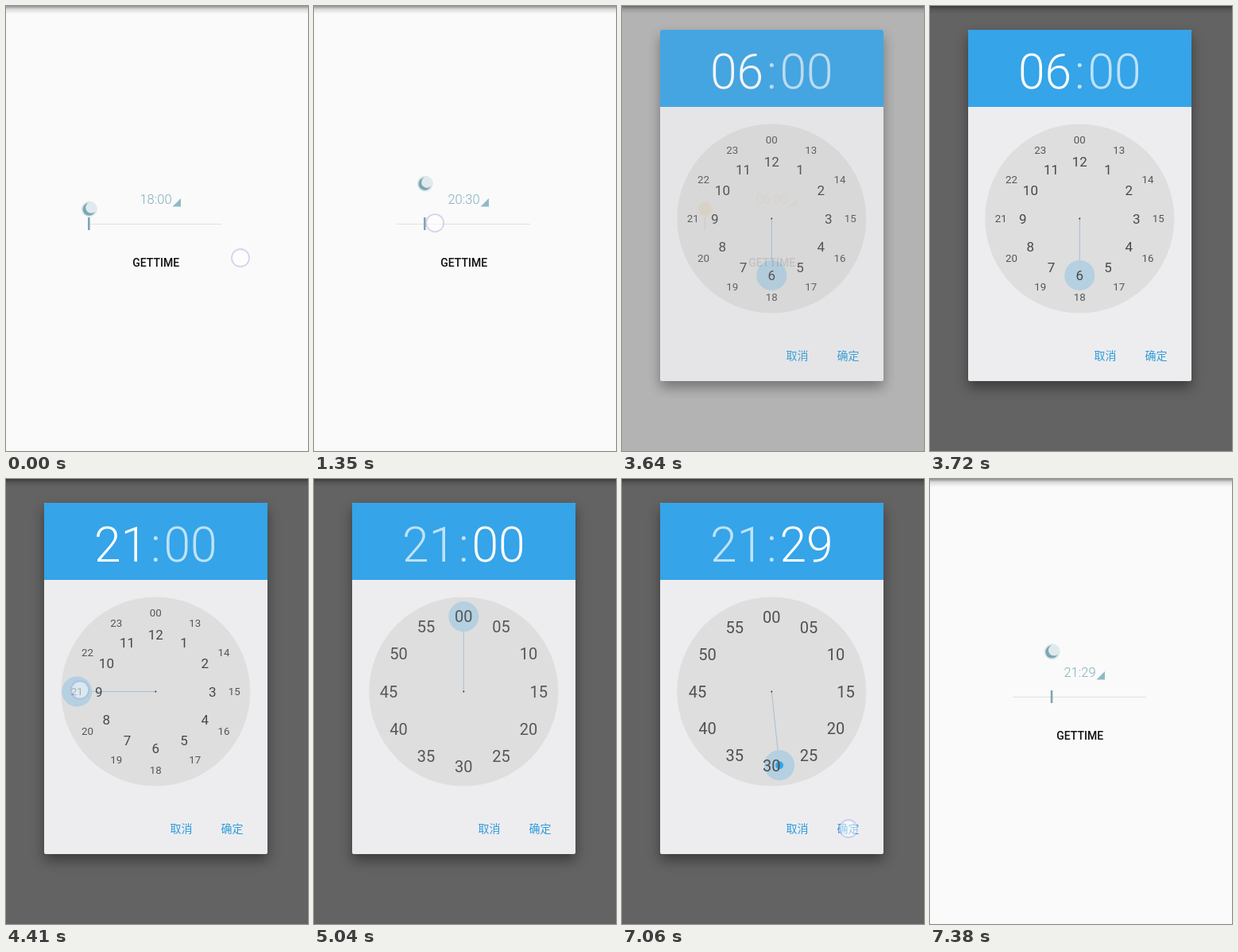
An HTML page with a canvas that plays this animation: 380 px wide and 560 px high, repeating every 8 s.

```html
<!DOCTYPE html>
<html lang="zh">
<head>
<meta charset="utf-8">
<title>Time picker</title>
<style>
  html, body { margin: 0; width: 100%; height: 100%; overflow: hidden; background: #fafafa; }
  canvas { display: block; }
</style>
</head>
<body>
<canvas id="stage" width="380" height="560"></canvas>
<script>
const LOOP = 8000, W = 380, H = 560, TAU = Math.PI * 2;
const DIAL = { x: 188.3, y: 267.5, r: 119 };
const LINE = { left: 104.5, width: 168, y: 274 };
const ARC_HEIGHT = 44.5;
const BLUE = '#35a4e8';
const MOON = { text: '#7fafbb', bar: '#7ba7b3', corner: '#8fbac5' };
const SUN = { text: '#eeb034', bar: '#eeb055', corner: '#fbd48a' };

const stage = document.getElementById('stage').getContext('2d');
const layer = document.createElement('canvas');
layer.width = W;
layer.height = H;
const dialog = layer.getContext('2d');

const clamp = v => Math.min(1, Math.max(0, v));
const progress = (t, from, to) => clamp((t - from) / (to - from));
const pad = n => String(n).padStart(2, '0');

// Piecewise linear track through [time, value] points.
function track(t, points) {
  if (t <= points[0][0]) return points[0][1];
  for (let i = 1; i < points.length; i++) {
    const [t0, v0] = points[i - 1], [t1, v1] = points[i];
    if (t <= t1) return v0 + (v1 - v0) * (t - t0) / (t1 - t0);
  }
  return points[points.length - 1][1];
}

function disc(c, x, y, r, fill) {
  c.fillStyle = fill;
  c.beginPath();
  c.arc(x, y, r, 0, TAU);
  c.fill();
}

// Text centred on x; y is the middle of the capitals.
function label(c, text, x, y, size, color, weight = 400, family = 'Roboto') {
  c.font = `${weight} ${size}px ${family}, sans-serif`;
  c.textAlign = 'center';
  c.fillStyle = color;
  c.fillText(text, x, y + size * 0.355);
}

const touchX = t => track(t, [[910, 102], [1100, 114], [1350, 152], [1700, 227], [1750, 227], [2530, 304]]);
const touchY = t => track(t, [[1350, 273], [1700, 285], [1750, 285], [2530, 301]]);

function sliderState(t) {
  if (t >= 6850) return { minutes: 21 * 60 + 29, day: false };
  const dragged = Math.max(0, touchX(t) - 13 - LINE.left) / LINE.width;
  if (dragged >= 1) return { minutes: 360, day: true };
  return { minutes: 1080 + Math.round(dragged * 72) * 10, day: false };
}

function drawSlider(c, t) {
  const { minutes, day } = sliderState(t);
  const theme = day ? SUN : MOON;
  const x = LINE.left + LINE.width * (minutes - (day ? 360 : 1080)) / 720;
  const half = LINE.width / 2;
  const radius = (half * half + ARC_HEIGHT * ARC_HEIGHT) / (2 * ARC_HEIGHT);
  const dx = x - LINE.left - half;
  const y = 255.5 - ARC_HEIGHT + radius - Math.sqrt(radius * radius - dx * dx);

  c.fillStyle = '#e0e0e0';
  c.fillRect(104, LINE.y, 168, 1);
  c.fillStyle = theme.bar;
  c.fillRect(x - 1.5, 266, 2.6, 16);

  if (day) {
    disc(c, x, y, 10.8, '#fce9c8');
    disc(c, x, y, 8, '#fdb515');
  } else {
    disc(c, x + 0.3, y, 10, '#dce8eb');
    disc(c, x, y + 0.3, 8, '#7ba7b3');
    disc(c, x + 2.7, y - 1.7, 7, '#e0eaec');
  }

  label(c, `${pad(Math.floor(minutes / 60))}:${pad(minutes % 60)}`, 188.5, 243, 16.5, theme.text, 300);
  c.fillStyle = theme.corner;
  c.beginPath();
  c.moveTo(220, 242);
  c.lineTo(220, 252.5);
  c.lineTo(209.5, 252.5);
  c.fill();
  label(c, 'GETTIME', 188.7, 323, 14, '#111', 500);
}

function drawScreen(c, t) {
  c.fillStyle = '#fafafa';
  c.fillRect(0, 0, W, H);
  const shadow = c.createLinearGradient(0, 0, 0, 10);
  shadow.addColorStop(0, 'rgba(0,0,0,.42)');
  shadow.addColorStop(0.4, 'rgba(0,0,0,.13)');
  shadow.addColorStop(1, 'rgba(0,0,0,0)');
  c.fillStyle = shadow;
  c.fillRect(0, 0, W, 10);
  drawSlider(c, t);
}

function onDial(turn, radius) {
  return [DIAL.x + radius * Math.sin(turn * TAU), DIAL.y - radius * Math.cos(turn * TAU)];
}

function ring(c, radius, size, color, weight, text) {
  for (let i = 0; i < 12; i++) label(c, text(i), ...onDial(i / 12, radius), size, color, weight);
}

function selector(c, turn, radius, dot) {
  const [x, y] = onDial(turn, radius);
  const [ex, ey] = onDial(turn, radius - 19);
  c.strokeStyle = 'rgba(90,140,190,.5)';
  c.lineWidth = 0.8;
  c.beginPath();
  c.moveTo(DIAL.x, DIAL.y);
  c.lineTo(ex, ey);
  c.stroke();
  disc(c, x, y, 19, 'rgba(53,164,232,.25)');
  if (dot) disc(c, x, y, 5, BLUE);
}

function drawDialog(c, t) {
  const hour = t < 4000 ? 6 : 21;
  const minute = t < 5520 ? 0 : 29;
  const swap = t - 4440;
  const active = '#fff', idle = 'rgba(255,255,255,.68)';

  c.clearRect(0, 0, W, H);
  c.save();
  c.shadowColor = 'rgba(0,0,0,.4)';
  c.shadowBlur = 16;
  c.shadowOffsetY = 8;
  c.fillStyle = '#ededef';
  c.beginPath();
  c.roundRect(48, 30, 281, 442, 2);
  c.fill();
  c.restore();

  c.fillStyle = BLUE;
  c.beginPath();
  c.roundRect(48, 30, 281, 97, [2, 2, 0, 0]);
  c.fill();
  label(c, pad(hour), 144.5, 82.3, 60.5, swap < 0 ? active : idle, 300);
  label(c, ':', 188.3, 82.3, 60.5, idle, 300);
  label(c, pad(minute), 232, 82.3, 60.5, swap < 0 ? idle : active, 300);

  disc(c, DIAL.x, DIAL.y, DIAL.r, '#dedede');

  // Hours drift outwards while minutes grow in from the centre.
  const hourScale = track(swap, [[0, 1], [100, 0.95], [500, 1.3]]);
  c.globalAlpha = 1 - progress(swap, 0, 500);
  if (c.globalAlpha > 0) {
    selector(c, hour / 12, (hour > 12 ? 99 : 71.5) * hourScale);
    ring(c, 99 * hourScale, 13.3, '#555', 400, i => pad(i ? i + 12 : 0));
    ring(c, 71.5 * hourScale, 17, '#484848', 400, i => String(i || 12));
  }
  const minuteScale = track(swap, [[125, 0.7], [525, 1.05], [625, 1]]);
  c.globalAlpha = progress(swap, 125, 625);
  if (c.globalAlpha > 0) {
    selector(c, minute / 60, 93.3 * minuteScale, minute % 5);
    ring(c, 93.3 * minuteScale, 20, '#505050', 400, i => pad(i * 5));
  }
  c.globalAlpha = 1;
  disc(c, DIAL.x, DIAL.y, 1, '#333');

  label(c, '取消', 220.5, 440, 14, '#2d9cdb', 400, '"Noto Sans CJK SC", "Noto Sans CJK"');
  label(c, '确定', 284.5, 440, 14, '#2d9cdb', 400, '"Noto Sans CJK SC", "Noto Sans CJK"');
}

// Each touch: start, end, position and opacity over time.
const TOUCHES = [
  { from: 0, to: 450, at: () => [295, 317], alpha: [[370, 1], [450, 0]] },
  { from: 760, to: 3350, at: t => [touchX(t), touchY(t)], alpha: [[2530, 1], [2650, 0.25]] },
  { from: 3350, to: 3560, at: () => [195, 245], alpha: [[3480, 1], [3560, 0]] },
  { from: 4000, to: 4510, at: () => [93, 265.5], alpha: [[4420, 1], [4510, 0]] },
  { from: 5500, to: 6540, at: () => [198, 352], alpha: [[6400, 1], [6440, 0.7], [6540, 0]] },
  { from: 6850, to: 7380, at: () => [285, 440], alpha: [[7250, 1], [7340, 0]] }
];

function drawTouch(c, t) {
  const touch = TOUCHES.find(({ from, to }) => t >= from && t < to);
  if (!touch) return;
  c.globalAlpha = track(t, touch.alpha);
  const [x, y] = touch.at(t);
  disc(c, x, y, 11, 'rgba(255,255,255,.5)');
  c.strokeStyle = 'rgba(150,150,215,.38)';
  c.lineWidth = 1.8;
  c.stroke();
  c.globalAlpha = 1;
}

function draw(t) {
  const leaving = 1 - progress(t, 7260, 7380);
  const dim = Math.pow(progress(t, 3520, 3720), 1.5) * leaving;
  const shown = (1 - Math.pow(1 - progress(t, 3500, 3720), 2)) * leaving;

  drawScreen(stage, t);
  if (shown > 0) {
    stage.fillStyle = `rgba(0,0,0,${0.605 * dim})`;
    stage.fillRect(0, 0, W, H);
    drawDialog(dialog, t);
    stage.globalAlpha = shown;
    stage.drawImage(layer, 0, 0);
    stage.globalAlpha = 1;
  }
  drawTouch(stage, t);
}

const start = performance.now();
function tick() {
  draw((performance.now() - start) % LOOP);
  requestAnimationFrame(tick);
}
tick();
</script>
</body>
</html>
```
